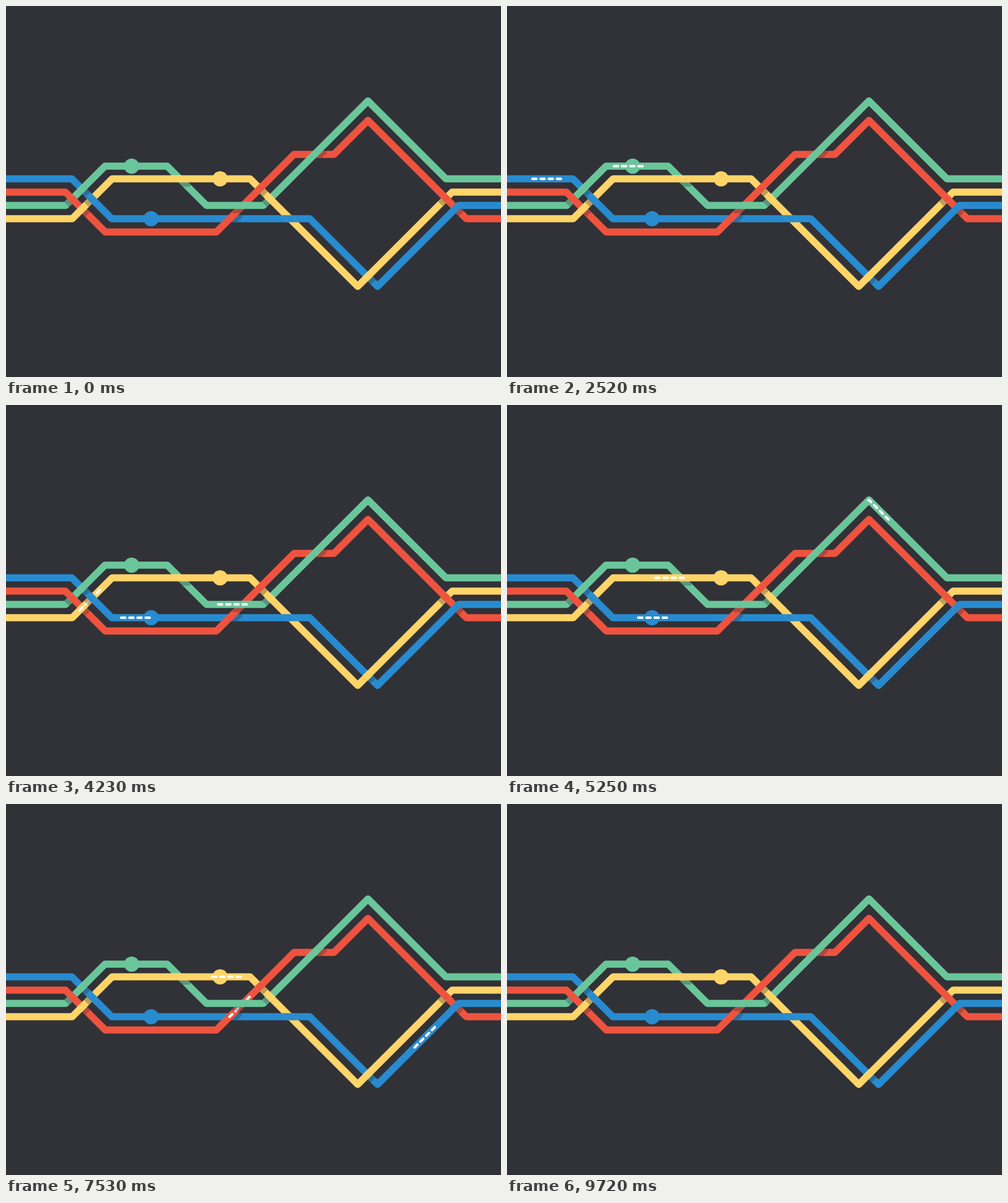
Animation, 800 px wide and 600 px high, one loop 9.81 s. Source, as an HTML page with a canvas:

```html
<!DOCTYPE html>
<html>
<head>
<meta charset="utf-8">
<style>
html, body { margin: 0; height: 100%; overflow: hidden; background: #313237; }
canvas { display: block; }
</style>
</head>
<body>
<canvas id="stage" width="800" height="600"></canvas>
<script>
const ctx = document.getElementById('stage').getContext('2d');
const LOOP = 9810, WIDTH = 11.5, TRAIN = 50, DASH = 6.5, GAP = 6.7;
const SLOPES = { d: 1, u: -1, '-': 0 };
const lane = i => 279.5 + 21.5 * i;

// Every bend starts a level stretch or one at 45 degrees; the heights follow from that.
function makeLine(color, y, over, slopes, bends, trip) {
  const segments = [...slopes].map((key, i) => {
    const from = bends[i - 1] ?? 0, to = bends[i] ?? 800, slope = SLOPES[key];
    const segment = { from, to, y, slope };
    y += slope * (to - from);
    return segment;
  });
  const path = new Path2D();
  segments.forEach(s => path.lineTo(s.from, s.y));
  path.lineTo(800, y);
  return { color, over, segments, path, ...trip };
}

// over: whether the line's first crossing passes on top; halt: where the train's head stops
const lines = [
  makeLine('#288bd0', lane(0), false, '-d-du-', [106.5, 171, 491, 600.5, 731.5],
    { station: 234.5, halt: 234, enter: 2120, stop: 4050, leave: 7880 }),
  makeLine('#ef533f', lane(1), true, '-d-u-ud-', [96, 160.5, 340, 465.5, 530, 585, 744],
    { halt: 0, enter: 5934, stop: 5934, leave: 9586 }),
  makeLine('#6ac69a', lane(2), false, '-u-d-ud-', [96.5, 160, 260.5, 324, 416, 585, 711],
    { station: 203, halt: 209, enter: 0, stop: 1530, leave: 5840 }),
  makeLine('#ffd469', lane(3), true, '-u-du-', [107, 171.5, 394.5, 568.5, 721],
    { station: 346, halt: 341, enter: 3400, stop: 6210, leave: 9704 })
];

function lengthTo(line, x) {
  return line.segments.reduce((sum, s) =>
    sum + Math.max(0, Math.min(x, s.to) - s.from) * Math.hypot(1, s.slope), 0);
}

function heightAt(line, x) {
  const s = line.segments.find(s => x <= s.to);
  return s.y + s.slope * (x - s.from);
}

function findCrossings() {
  const found = [];
  lines.forEach((a, i) => lines.slice(i + 1).forEach(b => {
    for (const p of a.segments) for (const q of b.segments) {
      const x = (q.y - p.y + p.slope * p.from - q.slope * q.from) / (p.slope - q.slope);
      if (x > Math.max(p.from, q.from) && x < Math.min(p.to, q.to)) {
        found.push({ x, y: heightAt(a, x), a, b, p, q });
      }
    }
  }));
  // Woven: each line goes over and under in turn.
  return found.sort((c, d) => c.x - d.x).map(({ x, y, a, b, p, q }) => {
    const crossing = a.over
      ? { x, y, upper: a, upSlope: p.slope, lowSlope: q.slope }
      : { x, y, upper: b, upSlope: q.slope, lowSlope: p.slope };
    a.over = !a.over;
    b.over = !b.over;
    return crossing;
  });
}

const crossings = findCrossings();
const UNSHADED = 9; // the one crossing without a shadow

const progress = (t, from, to) => Math.min(1, Math.max(0, (t - from) / (to - from)));

function headAt(line, t) {
  const halt = lengthTo(line, line.halt);
  if (t < line.stop) return halt * (1 - (1 - progress(t, line.enter, line.stop)) ** 1.8);
  const power = line.station ? 2.85 : 1;
  return halt + (lengthTo(line, 800) + TRAIN - halt) * progress(t, line.stop, line.leave) ** power;
}

function drawLine(line, t) {
  ctx.lineJoin = 'round';
  ctx.lineCap = 'butt';
  ctx.strokeStyle = ctx.fillStyle = line.color;
  ctx.lineWidth = WIDTH;
  ctx.stroke(line.path);
  if (line.station) {
    ctx.beginPath();
    ctx.arc(line.station, heightAt(line, line.station), 12.3, 0, 2 * Math.PI);
    ctx.fill();
  }
  ctx.lineCap = 'round';
  ctx.strokeStyle = '#fff';
  ctx.lineWidth = 4;
  ctx.setLineDash([DASH, GAP, DASH, GAP, DASH, GAP, DASH, 9999]);
  ctx.lineDashOffset = TRAIN - 2 - headAt(line, t);
  ctx.stroke(line.path);
  ctx.setLineDash([]);
}

function drawCrossing({ x, y, upper, upSlope, lowSlope }, index, t) {
  const turned = (slope, draw) => {
    ctx.save();
    ctx.translate(x, y);
    ctx.rotate(slope * Math.PI / 4);
    draw();
    ctx.restore();
  };
  ctx.save();
  ctx.beginPath();
  turned(lowSlope, () => ctx.rect(-20, -WIDTH / 2, 40, WIDTH));
  ctx.clip();
  if (index !== UNSHADED) {
    turned(upSlope, () => {
      ctx.fillStyle = 'rgba(48,49,54,.32)';
      ctx.fillRect(-20, 0, 40, WIDTH / 2 + 7);
    });
  }
  drawLine(upper, t);
  ctx.restore();
}

function frame(now) {
  const t = now % LOOP;
  ctx.fillStyle = '#313237';
  ctx.fillRect(0, 0, 800, 600);
  lines.forEach(line => drawLine(line, t));
  crossings.forEach((crossing, i) => drawCrossing(crossing, i, t));
}

let start;
function tick(now) {
  start ??= now;
  frame(now - start);
  requestAnimationFrame(tick);
}
frame(0);
requestAnimationFrame(tick);
</script>
</body>
</html>
```
